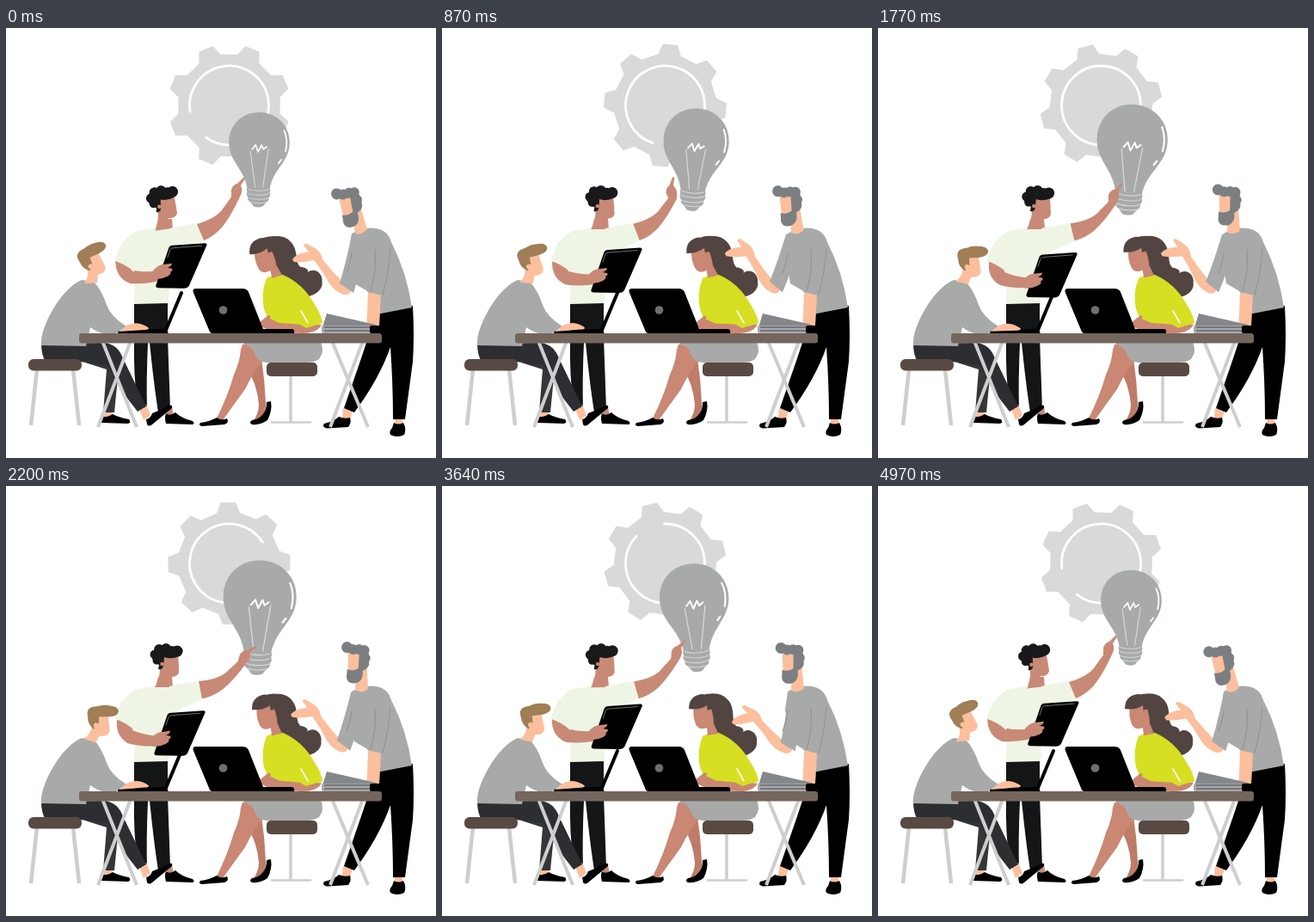
Animation, 500 px wide and 500 px high, one loop 5 s. Source, as an HTML page with a canvas:

```html
<!DOCTYPE html>
<html lang="en">
<head>
<meta charset="utf-8">
<title>Team idea</title>
<style>
html, body { margin: 0; width: 100%; height: 100%; overflow: hidden; background: #fff; }
canvas { display: block; width: 500px; height: 500px; }
</style>
</head>
<body>
<canvas id="stage"></canvas>
<script>
const LOOP = 5;
const canvas = document.getElementById('stage');
const ctx = canvas.getContext('2d');
const dpr = window.devicePixelRatio || 1;
canvas.width = canvas.height = 500 * dpr;

const C = {
  gear: '#d9d9d9', bulb: '#a8aaa9', grey: '#a8aaa9', fold: '#8f9190',
  leg: '#cecece', table: '#74665d', seat: '#584943', black: '#000',
  pants: '#2d2e31', jeans: '#141516', shirt: '#eff5e4', lime: '#d6df22',
  brown: '#c88a76', rose: '#c98774', peach: '#fbbf9d',
  curls: '#19191b', blond: '#a07e56', beard: '#7c7f81', hair: '#524541', white: '#fff'
};
const RAD = Math.PI / 180;

const cache = {};
const path = d => cache[d] || (cache[d] = new Path2D(d));

function fill(color, d) {
  ctx.fillStyle = color;
  ctx.fill(path(d));
}

function line(color, width, d, cap = 'round') {
  ctx.strokeStyle = color;
  ctx.lineWidth = width;
  ctx.lineCap = cap;
  ctx.lineJoin = 'round';
  ctx.stroke(path(d));
}

function dots(color, list) {
  ctx.fillStyle = color;
  for (const [x, y, r] of list) {
    ctx.beginPath();
    ctx.arc(x, y, r, 0, 7);
    ctx.fill();
  }
}

function box(color, x, y, w, h, r) {
  ctx.fillStyle = color;
  ctx.beginPath();
  ctx.roundRect(x, y, w, h, r);
  ctx.fill();
}

// Draw with a rotation (degrees) and scale around a pivot.
function turn(x, y, deg, draw, scale = 1) {
  ctx.save();
  ctx.translate(x, y);
  ctx.rotate(deg * RAD);
  ctx.scale(scale, scale);
  ctx.translate(-x, -y);
  draw();
  ctx.restore();
}

function shift(x, y, draw) {
  ctx.save();
  ctx.translate(x, y);
  draw();
  ctx.restore();
}

// Linear interpolation through [time, value] keys.
function keys(t, list) {
  for (let i = 1; i < list.length; i++) {
    const [a, v] = list[i - 1], [b, w] = list[i];
    if (t <= b) return v + (w - v) * (t - a) / (b - a);
  }
  return list[list.length - 1][1];
}

function gear(t) {
  const cx = 259.5, cy = 90, spin = -72 * t;
  ctx.beginPath();
  for (let i = 0; i < 8; i++) {
    const mid = spin + 22.5 + i * 45;
    for (const [da, r] of [[-13, 60], [-7, 71.5], [7, 71.5], [13, 60]]) {
      const a = (mid + da) * RAD;
      ctx.lineTo(cx + r * Math.cos(a), cy + r * Math.sin(a));
    }
  }
  ctx.closePath();
  ctx.fillStyle = C.gear;
  ctx.fill();
  ctx.beginPath();
  ctx.arc(cx, cy, 46, (spin + 171) * RAD, (spin + 486) * RAD);
  ctx.strokeStyle = C.white;
  ctx.lineWidth = 2.8;
  ctx.lineCap = 'round';
  ctx.stroke();
}

function bulb(t, pulse) {
  const tilt = keys(t, [[0, 0.7], [1.33, 5], [3.9, -3.6], [5, 0.7]]);
  turn(294, 153.5, tilt, () => {
    fill(C.bulb, 'M294,98 C314,98 329.5,113 329.5,133 C329.5,156 311,163 307,187 L281,187 C277,163 259,156 259,133 C259,113 274,98 294,98Z');
    fill(C.bulb, 'M282,185 L306,185 Q309,188 307,191 Q309,194 306,197 Q307,200 304,202 L301,205 Q300,208.5 294,208.5 Q288,208.5 287,205 L284,202 Q281,200 282,197 Q279,194 281,191 Q279,188 282,185Z');
    line('#d5d6d5', 1, 'M282,187.5 Q294,191 306,187.5 M282,192.5 Q294,196 306,192.5 M282,197.5 Q294,201 306,197.5 M285,202.5 Q294,205 303,202.5');
    line('#dcdddc', 1, 'M284,143 L290,185 M305,141 L299,185');
    line(C.white, 1.7, 'M286,141 L290,136 L293,144 L297,136 L299,141 L303,138');
    line(C.white, 1.8, 'M323,119 Q328,130 325,143 M320,153 L317,157');
  }, 1 + 0.245 * pulse);
}

function stander(t) {
  // legs and shoes
  fill(C.jeans, 'M149,319 L188,318 L188,385 Q191,415 187,447 L177,447 Q172,415 167,366 L165,366 Q163,410 164,444 L153,440 Q148,400 149,366Z');
  fill(C.brown, 'M187,441 L193,441 L195,451 L187,451Z');
  fill(C.jeans, 'M168,360 L188,360 L191,444 L178,444Z');
  fill(C.black, 'M186,448 Q190,452 197,447 Q204,454 217,457 Q220,460 217,461 L186,460 Q184,453 186,448Z');

  // torso
  fill(C.brown, 'M177,222 L193,222 L194,234 L174,234Z');
  fill(C.shirt, 'M172,233 Q181,236 194,232 L222,227 L230,247 L197,262 Q190,290 189,320 L149,321 L150,283 L127,270 Q134,245 152,236Z');

  const nod = keys(t, [[0, -8], [0.9, -1.5], [2.5, 0.5], [4.2, -2], [5, -8]]);
  turn(185, 230, nod, () => {
    fill(C.brown, 'M181,198 L200,196 Q201,206 201,217 Q199,223 189,222 L190,234 L173,234 Q179,224 179,212Z');
    fill(C.curls, 'M170,198 Q184,189 201,198 Q192,202 184,199 L183,209 Q182,214 177,213 L178,208 Q169,205 170,198Z');
    dots(C.curls, [[173, 196, 5.5], [178, 190, 6], [186, 189, 6], [193, 192, 6], [199, 192, 6.5], [175, 203, 4.5]]);
    dots(C.brown, [[181.5, 207, 2.2]]);
  });

  // raised arm
  const lift = keys(t, [[0, 0], [0.87, 2], [1.37, 6], [2.5, 14], [3.2, 10.5], [4.24, 1], [5, 0]]);
  const point = keys(t, [[0, 0], [0.87, -25], [1.37, -18], [2.2, 4], [3.04, -1], [4.24, -6], [5, 0]]);
  turn(228, 237, lift, () => {
    fill(C.brown, 'M222,228 Q242,222 250,213 L263,195 L271,198 Q262,218 251,232 Q241,243 230,247Z');
    turn(267, 196, point, () => {
      fill(C.brown, 'M262,198 L262,188 Q264,182 269,181 L276,174 Q279,174 277,177 L273,183 Q276,189 272,196 L270,200Z');
    });
  });
}

function leftLaptop() {
  line(C.black, 4, 'M204,308 L186,351');
  fill(C.black, 'M130,352 L184,350 L190,356 L130,356Z');
}

function tablet(t) {
  const drop = keys(t, [[0, 0.7], [2, 12.8], [4.5, -0.5], [5, 0.7]]);
  const dx = -drop * 0.17;
  turn(133, 282, drop, () => {
    fill(C.brown, 'M127,269 L148,277 L147,281 Q158,284 176,282 L186,279 L187,291 Q165,298 145,297 Q127,291 127,269Z');
  });
  // sleeve edge stays over the moving arm
  fill(C.shirt, 'M127,268 L135,249 L154,255 L149,284 Q140,275 127,271Z');
  shift(dx, drop, () => {
    fill(C.black, 'M194,252 L231,249.5 Q235,249.5 233,253 L213,299 Q211,302 207,302 L177,301.5 Q173,301 175,297 L189,256 Q190,252 194,252Z');
    line('#8c8c8c', 0.8, 'M188,266 L191,257 Q192,255 195,255 L228,252.5');
    fill(C.brown, 'M170,283 Q176,274 185,274 L193,273 Q193,276 188,278 L193,279 Q195,281 191,283 Q193,285 188,288 Q180,292 172,291Z');
  });
}

function leftStool() {
  line(C.leg, 4.5, 'M36,397 L29,462 M78,397 L85,462', 'butt');
  box(C.seat, 26, 385, 62, 13.5, 6);
}

function typist(t, pulse) {
  fill(C.peach, 'M113,443 L123,443 L124,453 L113,453Z M155,443 L163,438 L168,450 L160,456Z');
  fill(C.black, 'M111,451 Q117,454 124,449 Q132,453 143,455 Q146,459 142,460 L111,459Z');
  fill(C.black, 'M163,455 Q168,454 170,448 Q181,444 190,439 Q194,438 193,442 L170,461 Q166,464 164,461Z');
  fill('#35363a', 'M95,372 L124,370 Q132,380 131,396 L126,447 L113,447 L117,397 L92,389Z');
  fill(C.pants, 'M41,367 L115,366 Q130,368 136,384 L163,440 L153,446 Q130,418 118,392 L86,388 L46,388 Q41,380 41,367Z');
  leftStool();
  fill(C.grey, 'M88,293 C68,302 53,327 45,347 Q40,360 41,369 L93,370 L98,348 Q106,354 116,356 L128,355 L140,347 Q122,336 117,322 Q111,304 102,295Z');

  const tap = 1.8 * Math.sin(t * 2 * Math.PI * 3);
  turn(136, 350, tap, () => {
    fill(C.peach, 'M135,351 L140,346 Q149,342 156,344 Q163,346 166,349 Q166,351 161,351 L131,353Z');
  });

  turn(99, 293, -28 + 28 * pulse, () => {
    fill(C.peach, 'M104,266 L121,268 L121,287 Q118,294 109,291 L104,299 L90,293 Q101,288 101,276Z');
    fill(C.blond, 'M97,268 Q95,256 109,257 Q116,255 123,257 Q134,259 133,265 Q132,270 122,270 L110,269 L109,277 L103,283 Q96,277 97,268Z');
    dots(C.peach, [[106, 279, 3]]);
  });
}

function woman(t) {
  // stool
  line(C.leg, 3.5, 'M331,404 L331,458', 'butt');
  line(C.leg, 2.6, 'M309,458.5 L354,458.5');
  box(C.seat, 303, 389, 59, 16, 5);

  // legs
  fill('#be7c69', 'M285,383 L297,384 Q301,410 302,436 Q303,447 296,454 L287,458 Q294,448 294,438 Q292,414 281,398Z');
  fill(C.rose, 'M275,368 Q283,364 300,370 L300,386 Q288,399 278,420 L252,456 L244,456 Q258,428 265,403 Q272,388 273,374Z');
  fill(C.black, 'M226,459 Q236,458 245,453 Q250,457 257,454 Q260,459 254,461 L228,463 Q223,462 226,459Z');
  fill(C.black, 'M303,435 L308,434 Q310,445 304,456 Q296,462 286,461 Q282,459 286,456 Q294,455 298,450 Q303,445 303,435Z');
  fill(C.grey, 'M277,365 L366,365 Q371,376 364,385 Q359,389 348,389 L303,389 Q292,389 289,378 Q286,370 277,368Z');

  // flowing hair behind the blouse
  const nod = keys(t, [[0, -8], [3, 0], [5, 0]]);
  turn(325, 275, nod * 0.5, () => {
    fill(C.hair, 'M312,242 C327,239 337,250 338,262 C339,270 338,274 342,279 C348,280 352,283 350,286 C358,280 368,288 366,298 C367,306 358,314 346,314 L330,314 Q314,288 308,262Z');
  });

  // blouse and forearm
  fill(C.lime, 'M303,291 Q314,285 322,287 Q345,297 358,320 Q367,334 368,343 L349,352 L303,352 Q306,338 300,327 Q296,308 303,291Z');
  turn(340, 348, 1.2 * Math.sin(t * 2 * Math.PI * 2), () => {
    fill(C.rose, 'M367,345 Q362,355 345,355 L312,354 L296,347 Q291,346 295,342 L305,334 Q309,334 307,338 L318,343 L347,345Z');
  });
  fill(C.lime, 'M340,325 L361,326 L368,343 L349,349 L340,344Z');
  line(C.white, 1.6, 'M343,329 L351,343');

  turn(315, 287, nod, () => {
    fill(C.hair, 'M306,242 Q327,239 336,254 Q339,268 334,281 L322,286 Q314,275 308,255Z');
    fill(C.rose, 'M293,257 Q302,258 307,252 L312,257 Q316,266 316,276 L321,288 L309,290 L308,281 Q299,285 295,277 Q291,267 293,257Z');
    fill(C.hair, 'M287,259 Q287,244 302,242 Q315,242 314,257 L309,264 L308,255 Q299,261 287,259Z');
    dots(C.rose, [[311, 263, 3]]);
  });
}

function bigLaptop() {
  fill(C.black, 'M221,303 L275,303 Q280,303 282,307 L299,350 L333,350 Q336,351 335,355 L240,355 Q237,355 236,351 L218,308 Q216,303 221,303Z');
  dots('#6f6f6f', [[252.5, 328, 4.8]]);
}

function books() {
  fill('#86878a', 'M373,332 L430,345 L434,348 L368,348Z');
  box('#a7a8ab', 367, 346, 66, 9, 2);
  line('#66676a', 1.4, 'M370,348 L430,348 M370,352 L430,352', 'butt');
  box(C.black, 423, 346, 13, 9, 2);
}

function mentor(t, pulse) {
  fill(C.peach, 'M392,442 L403,445 L400,455 L391,453Z M452,452 L461,452 L461,463 L452,463Z');
  fill(C.black, 'M370,460 Q382,457 387,452 Q394,455 400,453 Q402,459 398,464 L373,465.5 Q367,464 370,460Z');
  fill(C.black, 'M451,459 Q456,462 462,459 Q466,466 463,473 Q455,477 447,473 Q445,469 449,465Z');
  fill(C.black, 'M431,330 L473,323 Q475,358 473,388 L464,455 L450,455 Q450,415 447,371 Q434,408 405,447 L393,442 Q413,385 431,330Z');
  fill(C.grey, 'M402,239 Q415,231 430,233 Q444,235 448,249 Q466,284 472,325 L431,333 Q427,316 422,307 L405,297 L399,260Z');

  // supporting arm
  fill(C.peach, 'M421,307 L436,309 Q435,332 434,346 L420,346 Q419,340 420,334Z');
  fill(C.grey, 'M423,240 L446,248 Q446,283 437,311 L420,307 Q426,283 423,255Z');
  line(C.fold, 1, 'M447,257 Q445,285 438,310 M429,258 Q431,284 424,306');

  const raise = Math.sin(pulse * Math.PI / 2);
  turn(412, 239, -14.5 * (1 - raise), () => {
    fill(C.peach, 'M398,194 L416,193 L420,211 L421,236 Q413,242 406,237 L408,217 L398,214Z');
    fill(C.beard, 'M397,213 Q404,216 410,212 L411,196 L422,194 Q424,206 420,212 L415,215 Q416,226 408,229 Q397,231 396,222Z');
    dots(C.beard, [[397, 187.5, 6.5], [404, 190, 6], [411, 190, 6], [417, 191, 6], [419, 200, 5], [418, 207, 4.5]]);
  });

  // gesturing arm
  const swing = keys(t, [[0, 0], [1.33, 8], [3.2, -4], [4.3, -4.5], [5, 0]]);
  shift(-0.45 * swing, 0, () => turn(409, 245, swing, () => {
    fill(C.peach, 'M333,269 Q337,263 347,261 L352,260 L346,253 Q346,250 350,251 L361,257 Q367,262 368,269 Q379,283 391,295 L402,304 Q400,311 393,310 Q383,307 376,297 Q367,281 358,270 Q346,273 335,272Z');
    fill(C.grey, 'M402,240 L417,243 Q417,268 404,308 L388,297 Q396,270 402,240Z');
  }));
  line(C.fold, 1, 'M402,262 Q400,276 396,285');
}

function table() {
  line(C.leg, 4, 'M112,364 L152,464 M145,364 L107,464 M379,364 L421,464 M415,364 L377,464', 'butt');
  box(C.table, 85, 355, 352, 11.5, 3);
}

function draw(t) {
  ctx.setTransform(dpr, 0, 0, dpr, 0, 0);
  ctx.fillStyle = C.white;
  ctx.fillRect(0, 0, 500, 500);
  const pulse = keys(t, [[0, 0], [2.62, 1], [5, 0]]);
  gear(t);
  bulb(t, pulse);
  stander(t);
  leftLaptop();
  tablet(t);
  typist(t, pulse);
  woman(t);
  bigLaptop();
  mentor(t, pulse);
  books();
  table();
}

const start = performance.now();
function tick(now) {
  draw(Math.max(0, now - start) / 1000 % LOOP);
  requestAnimationFrame(tick);
}
draw(0);
requestAnimationFrame(tick);
</script>
</body>
</html>
```
